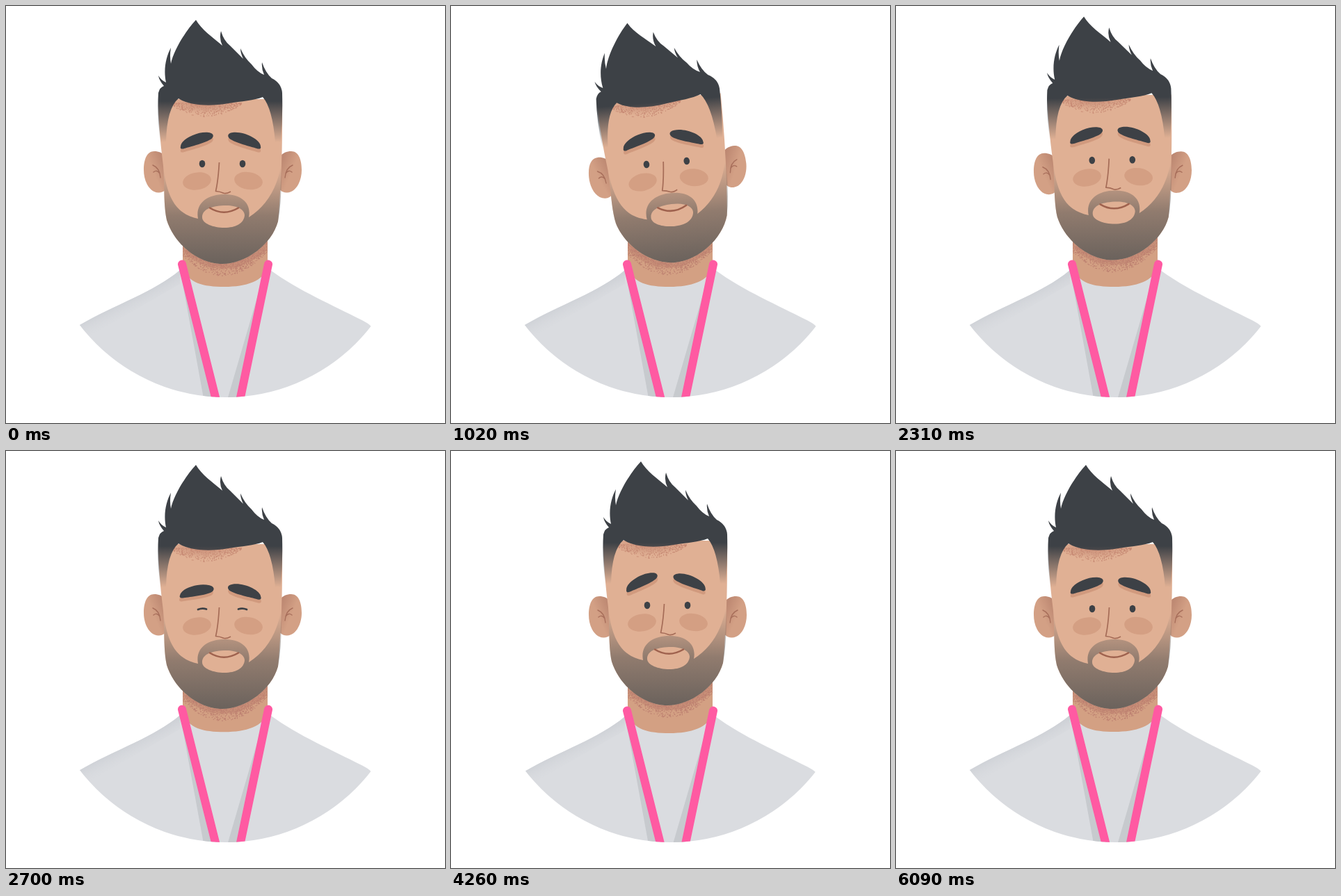
Recreate the animation shown at these times as an HTML page. Size 631 by 600 pixels, loop 6150 ms.

```html
<!DOCTYPE html>
<html lang="en">
<head>
<meta charset="utf-8">
<title>Portrait</title>
<style>
html, body { margin: 0; width: 100%; height: 100%; overflow: hidden; background: #fff; }
svg { display: block; width: 631px; height: 600px; }
</style>
</head>
<body>
<svg viewBox="0 0 631 600" fill="none">
  <defs>
    <clipPath id="disc"><circle cx="316" cy="299" r="264"/></clipPath>
    <clipPath id="neckClip"><path id="neck" d="M254 300H376V376C370 396 345 404 314 404S262 399 254 376Z"/></clipPath>
    <linearGradient id="beardFill" gradientUnits="userSpaceOnUse" x1="0" y1="232" x2="0" y2="371">
      <stop stop-color="#665f5a" stop-opacity="0"/>
      <stop offset=".5" stop-color="#665f5a" stop-opacity=".65"/>
      <stop offset="1" stop-color="#665f5a" stop-opacity=".96"/>
    </linearGradient>
    <linearGradient id="hairFill" gradientUnits="userSpaceOnUse" x1="0" y1="137" x2="0" y2="196">
      <stop stop-color="#3d4146"/>
      <stop offset="1" stop-color="#3d4146" stop-opacity="0"/>
    </linearGradient>
    <linearGradient id="earFill" gradientUnits="userSpaceOnUse" x1="211" y1="236" x2="230" y2="228">
      <stop stop-color="#d3a085"/>
      <stop offset="1" stop-color="#bd8872"/>
    </linearGradient>
    <linearGradient id="sleeveFill" gradientUnits="userSpaceOnUse" x1="176" y1="422" x2="188" y2="446">
      <stop stop-color="#cfd2d7"/>
      <stop offset="1" stop-color="#dadce0" stop-opacity="0"/>
    </linearGradient>
    <radialGradient id="foreheadFill" gradientUnits="userSpaceOnUse" cx="0" cy="0" r="1"
      gradientTransform="translate(285 138) scale(52 17)">
      <stop offset=".2" stop-color="#cb917a"/>
      <stop offset="1" stop-color="#cb917a" stop-opacity="0"/>
    </radialGradient>
    <path id="arch" d="M251 202C251 192 275 180 291 182C300 183 299 189 294 192C284 198 262 203 255 205.500C252 206 250 205 251 202Z"/>
    <g id="brow">
      <use href="#arch" fill="#d19a7e" y="5"/>
      <use href="#arch" fill="#3d4146"/>
    </g>
    <g id="ear">
      <path fill="url(#earFill)" d="M213 209C226 209 236 219 236 238C236 258 230 269 219 268.500C206 268 198 252 198 236C198 220 203 209 213 209Z"/>
      <path stroke="#a86f5b" stroke-width="1.400" stroke-linecap="round" d="M211 229Q221 233 222 247M212 239Q217 235 221 241"/>
    </g>
  </defs>

  <g clip-path="url(#disc)">
    <g id="body">
      <path fill="#dadce0" d="M86 470L106 459C156 430 214 411 250 380H380C424 412 476 433 517 455Q523 458 527 464L545 474V590H86Z"/>
      <path fill="url(#sleeveFill)" d="M86 470L106 459C156 430 214 411 250 380V400L118 476Z"/>
      <path fill="#c7cace" d="M250 378L285 570H300L256 378ZM373 378L317 570H338L379 378Z"/>
      <use href="#neck" fill="#d3a083"/>
      <g clip-path="url(#neckClip)">
        <g id="neckShade">
          <path stroke="#c48b75" stroke-width="16" opacity=".75" d="M250 339Q311 403 382 335"/>
          <path id="neckGrain" fill="#bd8070"/>
        </g>
      </g>
      <path stroke="#ff5aa2" stroke-width="12" stroke-linecap="round" d="M253 371.500L303.500 573M377 371.500L335 573"/>
    </g>
  </g>

  <g id="tilt">
    <g id="ears">
      <use href="#ear"/>
      <use href="#ear" transform="translate(623) scale(-1 1)"/>
    </g>
    <g id="head">
      <path fill="#e0b094" d="M219 134H397Q398 235 391 310C382 343 345 371 311 371S242 343 231 308C226 285 228 255 226 230Q219 175 219 134Z"/>
      <path fill="url(#foreheadFill)" d="M236 128H345V160H236Z"/>
      <path id="foreheadGrain" fill="#c78a74"/>
      <path id="hair" fill="url(#hairFill)" d="M219 125Q221 117 227 115Q220 107 219 100Q223 107 230 110C226 91 230 73 237 60Q235 72 237 83C241 63 259 35 273 20C281 34 296 44 311 57Q306 47 309 36Q313 50 322 57L341 76Q337 68 337 61Q343 75 353 84Q361 95 371 99Q367 90 368 81Q373 96 382 104Q396 111 397 125Q398 162 395 196H387Q383 147 369 131C357 136 338 137 320 140C291 145 263 143 248 133Q231 147 230 196H222Q217 157 219 125Z"/>
      <path fill="url(#beardFill)" fill-rule="evenodd" d="M226 230C232 285 250 300 276 306C272 284 289 271 314 271S353 284 349 304Q388 279 396 225Q397 275 391 310C382 343 345 371 311 371S242 343 231 308C226 285 228 255 226 230ZM282 304C282 293 294 288 313 287S343 293 343 301C342 313 330 319 314 319S282 313 282 304Z"/>
      <path stroke="#9f624e" stroke-width="2.600" stroke-linecap="round" d="M293 290.500Q313 303 334 290.500"/>
      <g fill="#d49f83">
        <ellipse cx="274.500" cy="252" rx="20.500" ry="12.500" transform="rotate(-9 274.500 252)"/>
        <ellipse cx="348.500" cy="251.500" rx="20.500" ry="12.500" transform="rotate(9 348.500 251.500)"/>
      </g>
      <path stroke="#a56c57" stroke-width="1.700" stroke-linejoin="round" d="M306.500 225Q305 251 301.500 266.500Q308 267 312 269T323 267"/>
      <g id="eyes" fill="#3d4146">
        <ellipse cx="282" cy="227" rx="4.300" ry="5.300"/>
        <ellipse cx="340" cy="227" rx="4.300" ry="5.300"/>
      </g>
      <path id="lids" stroke="#3d4146" stroke-width="2.800" stroke-linecap="round" d="M276 228Q282 225.500 288 227.500M334 227.500Q340 225.500 346 228"/>
      <g id="brows">
        <use id="leftBrow" href="#brow"/>
        <g transform="translate(617) scale(-1 1)"><use id="rightBrow" href="#brow"/></g>
      </g>
    </g>
  </g>
</svg>
<script>
const LOOP = 6150;
const el = id => document.getElementById(id);
const place = (id, transform) => el(id).setAttribute('transform', transform);
const shift = (id, y) => place(id, `translate(0 ${y})`);

// Grainy shadow: specks that thin out below an edge
let seed = 7;
const random = () => (seed = seed * 16807 % 2147483647) / 2147483647;
function grain(id, count, left, right, edge, depth) {
  let d = '';
  for (let i = 0; i < count; i++) {
    const x = left + (right - left) * random();
    const y = edge(x) + depth(x) * random() ** 1.6;
    d += `M${x.toFixed(1)} ${y.toFixed(1)}h1.2v1.2h-1.2z`;
  }
  el(id).setAttribute('d', d);
}
grain('neckGrain', 800, 254, 376, x => 370 - (x - 311) ** 2 * 0.0085, () => 18);
grain('foreheadGrain', 420, 237, 338, () => 139, x => 20 * (1 - ((x - 287) / 54) ** 2));

function ease(t, from, to) {
  const x = Math.min(1, Math.max(0, (t - from) / (to - from)));
  return (1 - Math.cos(Math.PI * x)) / 2;
}
// Goes 0 to 1 between a and b, back to 0 between c and d
const pulse = (t, a, b, c, d) => ease(t, a, b) - ease(t, c, d);

function draw(t) {
  const lean = pulse(t, 480, 920, 1980, 2420);
  const hops = pulse(t, 350, 680, 680, 1150) + pulse(t, 2130, 2450, 2550, 2700);
  const nod = pulse(t, 2550, 2690, 2740, 2960);
  const blink = pulse(t, 2570, 2670, 2740, 2850);
  const sink = pulse(t, 2560, 3300, 4560, 4900);
  const lift = pulse(t, 3200, 3900, 5320, 5900);
  const worry = pulse(t, 3000, 3450, 5320, 6090);
  const rise = pulse(t, 4560, 4940, 5320, 6000);

  const bodyY = 2 * sink - 4 * rise - 2 * pulse(t, 350, 680, 680, 1000);
  const headY = -9 * hops - 5 * lift - 6.2 * rise;
  const turn = 8 * nod - 7 * worry;

  shift('body', bodyY);
  shift('neckShade', headY - bodyY);
  place('tilt', `rotate(${-4.9 * lean} 311 239)`);
  shift('ears', 2.5 * hops - 3 * nod + 3 * rise);
  shift('head', headY);
  place('hair', `translate(${-lean} ${2 * lean})`);
  shift('brows', -4 * hops + 9 * nod - 7 * rise);
  place('leftBrow', `rotate(${turn} 275 194)`);
  place('rightBrow', `rotate(${turn * 0.3} 275 194)`);
  place('eyes', `translate(0 227) scale(1 ${1 - blink}) translate(0 -227)`);
  el('eyes').style.display = blink > 0.8 ? 'none' : '';
  el('lids').style.display = blink > 0.8 ? '' : 'none';
}

const start = performance.now();
function tick() {
  draw((performance.now() - start) % LOOP);
  requestAnimationFrame(tick);
}
tick();
</script>
</body>
</html>
```
